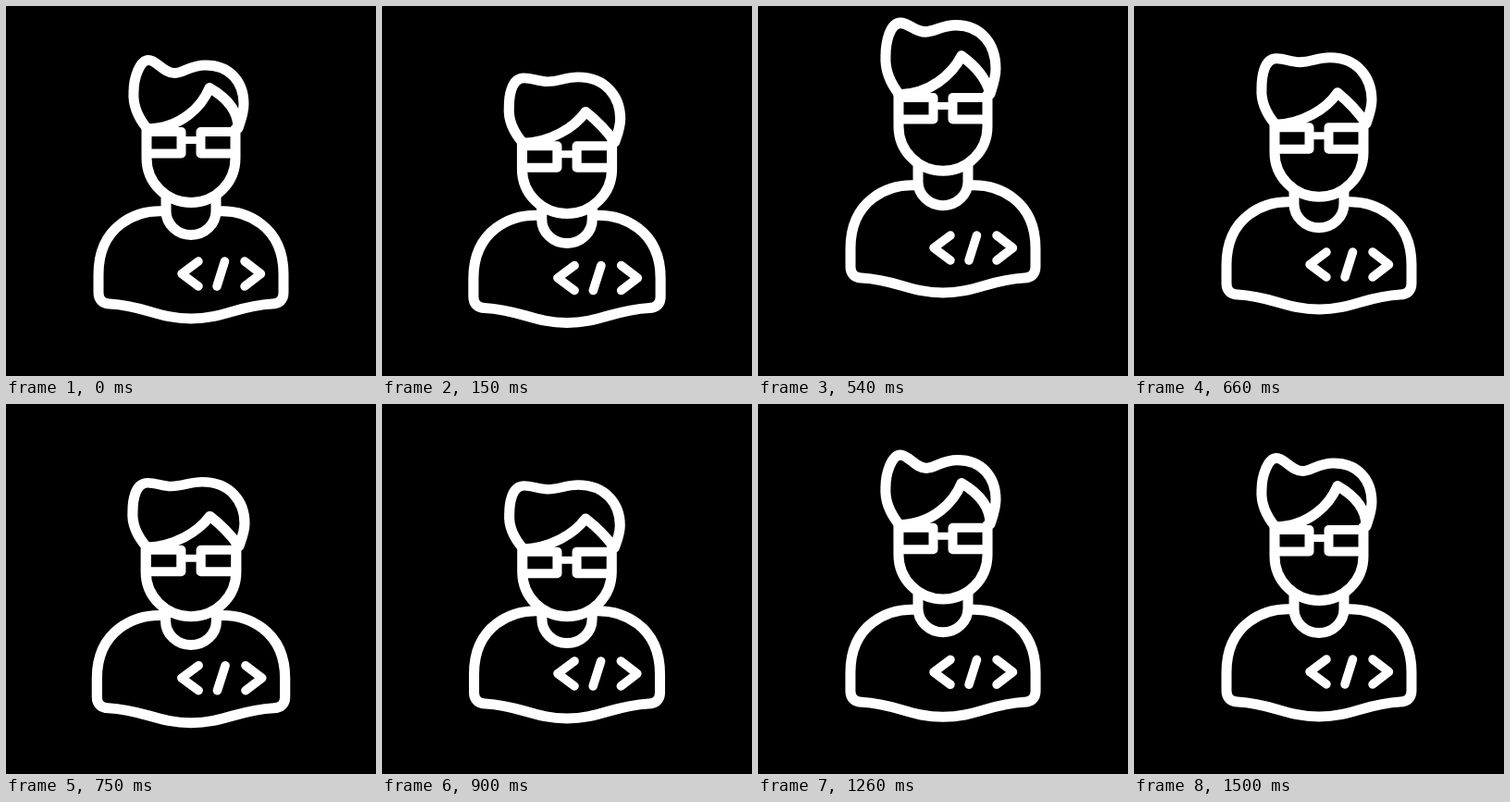
An HTML page that plays this animation: 400 px wide and 400 px high, repeating every 3.53 s.

```html
<!DOCTYPE html>
<html lang="en">
<head>
<meta charset="utf-8">
<title>Jumping developer icon</title>
<style>
  html, body { margin: 0; width: 100%; height: 100%; overflow: hidden; background: #000; }
  svg { display: block; width: 100%; height: 100%; }
</style>
</head>
<body>
<svg viewBox="0 0 400 400">
  <g id="figure" fill="none" stroke="#fff" stroke-width="11" stroke-linecap="round" stroke-linejoin="round">
    <g id="body">
      <path d="M172 222C140 220 100 238 100 290V310C100 318 105 322 112 322C150 324 165 338 200 338C235 338 250 324 288 322C295 322 300 318 300 310V290C300 238 260 220 228 222"/>
      <path stroke-width="9.5" d="M208 276L190 289.5L208 303M236.5 276L228 303M258 276L275.5 289.5L258 303"/>
    </g>
    <path id="collar"/>
    <path id="face"/>
    <g id="glasses" stroke-width="10">
      <path d="M152 136H189.5V159.5H152ZM210.5 136H248V159.5H210.5Z"/>
      <path stroke-width="8" d="M190 145H210"/>
    </g>
    <path id="hair"/>
  </g>
</svg>
<script>
const LOOP = 3530, STEP = 30, MOVE_END = 1500;
const HAIR_BASE = 132, HAIR_HEIGHT = 72;

// crouch depth, jump height, time of the peak, half the flight time, landing bounce
const BODY = { dip: 10, height: 32.7, peak: 440, half: 264, amp: 11, period: 430, decay: 300 };
const HEAD = { dip: 16, height: 43.1, peak: 461, half: 211, amp: 38, period: 760, decay: 350 };

const el = id => document.getElementById(id);
const [figure, body, collar, face, glasses, hair] =
  ["figure", "body", "collar", "face", "glasses", "hair"].map(el);
const mix = (a, b, k) => a + (b - a) * k;
const shift = (node, y) => node.setAttribute("transform", `translate(0 ${y})`);

function ramp(t, from, to) {
  const u = Math.min(1, Math.max(0, (t - from) / (to - from)));
  return u * u * (3 - 2 * u);
}

// crouch, ballistic flight, then a damped landing; positive is down
function hop(t, { dip, height, peak, half, amp, period, decay }) {
  const takeoff = peak - half, s = t - peak - half;
  if (t < takeoff) return dip * Math.sin(Math.PI * t / takeoff);
  if (s < 0) return height * (((t - peak) / half) ** 2 - 1);
  return amp * Math.sin(2 * Math.PI * s / period) * Math.exp(-((s / decay) ** 2));
}

function hairPath(f) {
  const tip = 58.5 + 2 * f, dip = 72.5 - 8 * f, crown = 64 - 4.5 * f, peak = 88.5 + 9.5 * f;
  return `M153 133C143 121 137 107 138 93
    C138 ${77 + 5 * f} ${145 - 5 * f} ${tip} 154 ${tip}
    C163 ${tip} 170 ${dip} ${182 - 3 * f} ${dip}
    C192 ${dip} 198 ${crown} ${216 - 4 * f} ${crown}
    C242 ${crown} 257 82 257 106C257 116 254 123 251 132
    C${251 - 8 * f} ${115 + 5 * f} ${240 - 8 * f} ${100 + 8 * f} 220 ${peak}
    C${212 - 4 * f} ${108 + 8 * f} ${190 - 8 * f} 132 153 133Z`;
}

function draw(ms) {
  const t = Math.floor((ms % LOOP) / STEP) * STEP;
  const moving = t < MOVE_END;
  const bodyY = moving ? hop(t, BODY) : 0;
  const headY = moving ? hop(t, HEAD) : 0;
  const faceY = mix(bodyY, headY, 0.7);
  const neckY = mix(bodyY, faceY, 0.6);

  // the hair flattens during the jump and stretches where the head leads the body
  const lead = bodyY - headY;
  const flat = ramp(t, 0, 150) * (1 - ramp(t, 900, 1070)) * (1 - Math.max(0, lead) / 18);
  const stretch = 1 + lead * (lead > 0 ? 0.45 : 0.2) / HAIR_HEIGHT;
  const wide = 1 + Math.max(0, bodyY) / 400;

  figure.setAttribute("transform", `translate(${200 * (1 - wide)} 0) scale(${wide} 1)`);
  shift(body, bodyY);
  shift(glasses, headY);
  hair.setAttribute("transform",
    `translate(0 ${headY + HAIR_BASE * (1 - stretch)}) scale(1 ${stretch})`);
  hair.setAttribute("d", hairPath(flat));
  collar.setAttribute("d",
    `M173 ${206 + faceY}V${221.5 + neckY}a27 26 0 0 0 54 0V${206 + faceY}`);
  face.setAttribute("d",
    `M152 ${133 + headY}V${164.5 + faceY}a48 48 0 0 0 96 0V${133 + headY}`);
}

const start = performance.now();
function tick() {
  draw(performance.now() - start);
  requestAnimationFrame(tick);
}
tick();
</script>
</body>
</html>
```
